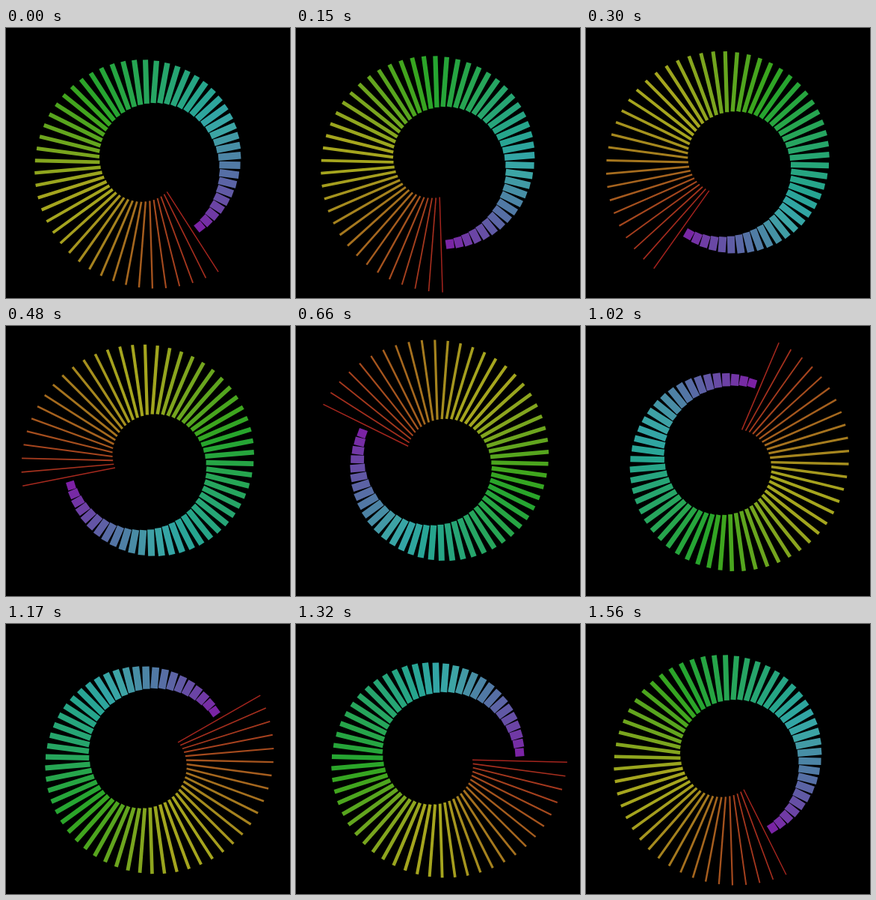
Write an HTML page without scripts that moves like this. It is 380 px wide and 360 px high and loops after 1.59 s.

```html
<!DOCTYPE html>
<html lang="en">
<head>
<meta charset="utf-8">
<title>Spiral spinner</title>
<style>
  /* Position of the leading red bar, counted in bars. */
  @property --head {
    syntax: "<number>";
    inherits: true;
    initial-value: 0.5;
  }

  html, body {
    margin: 0;
    width: 100%;
    height: 100%;
    overflow: hidden;
    background: #000;
  }

  svg {
    display: block;
    width: 380px;
    height: 360px;
    animation: sweep 1590ms steps(48) infinite;
  }

  @keyframes sweep {
    from { --head: 0.5; }
    to { --head: 60.74; }
  }

  /* --u is the age of a bar: 0 is short, wide and purple; 1 is long, thin and red. */
  rect {
    --u: calc(mod(var(--head) - var(--i) - 1, 58) / 58);
    --red: max(125 - 300 * var(--u), 38, min(165, 640 * var(--u) - 282));
    --green: min(31 + 620 * var(--u), 165, 572 - 540 * var(--u));
    --blue: clamp(30, 285 - 480 * var(--u), 165);
    x: -0.5px;
    y: -0.5px;
    width: 1px;
    height: 1px;
    fill: rgb(var(--red), var(--green), var(--blue));
    transform:
      rotate(calc(57.2deg + var(--i) * 360deg / 58))
      translate(108.7px)
      scale(calc(11 + 117 * var(--u)), calc(11 - 9.6 * var(--u)));
  }
</style>
</head>
<body>
<svg viewBox="-190.8 -180.3 380 360">
  <rect style="--i:0"/><rect style="--i:1"/><rect style="--i:2"/><rect style="--i:3"/><rect style="--i:4"/>
  <rect style="--i:5"/><rect style="--i:6"/><rect style="--i:7"/><rect style="--i:8"/><rect style="--i:9"/>
  <rect style="--i:10"/><rect style="--i:11"/><rect style="--i:12"/><rect style="--i:13"/><rect style="--i:14"/>
  <rect style="--i:15"/><rect style="--i:16"/><rect style="--i:17"/><rect style="--i:18"/><rect style="--i:19"/>
  <rect style="--i:20"/><rect style="--i:21"/><rect style="--i:22"/><rect style="--i:23"/><rect style="--i:24"/>
  <rect style="--i:25"/><rect style="--i:26"/><rect style="--i:27"/><rect style="--i:28"/><rect style="--i:29"/>
  <rect style="--i:30"/><rect style="--i:31"/><rect style="--i:32"/><rect style="--i:33"/><rect style="--i:34"/>
  <rect style="--i:35"/><rect style="--i:36"/><rect style="--i:37"/><rect style="--i:38"/><rect style="--i:39"/>
  <rect style="--i:40"/><rect style="--i:41"/><rect style="--i:42"/><rect style="--i:43"/><rect style="--i:44"/>
  <rect style="--i:45"/><rect style="--i:46"/><rect style="--i:47"/><rect style="--i:48"/><rect style="--i:49"/>
  <rect style="--i:50"/><rect style="--i:51"/><rect style="--i:52"/><rect style="--i:53"/><rect style="--i:54"/>
  <rect style="--i:55"/><rect style="--i:56"/><rect style="--i:57"/>
</svg>
</body>
</html>
```
